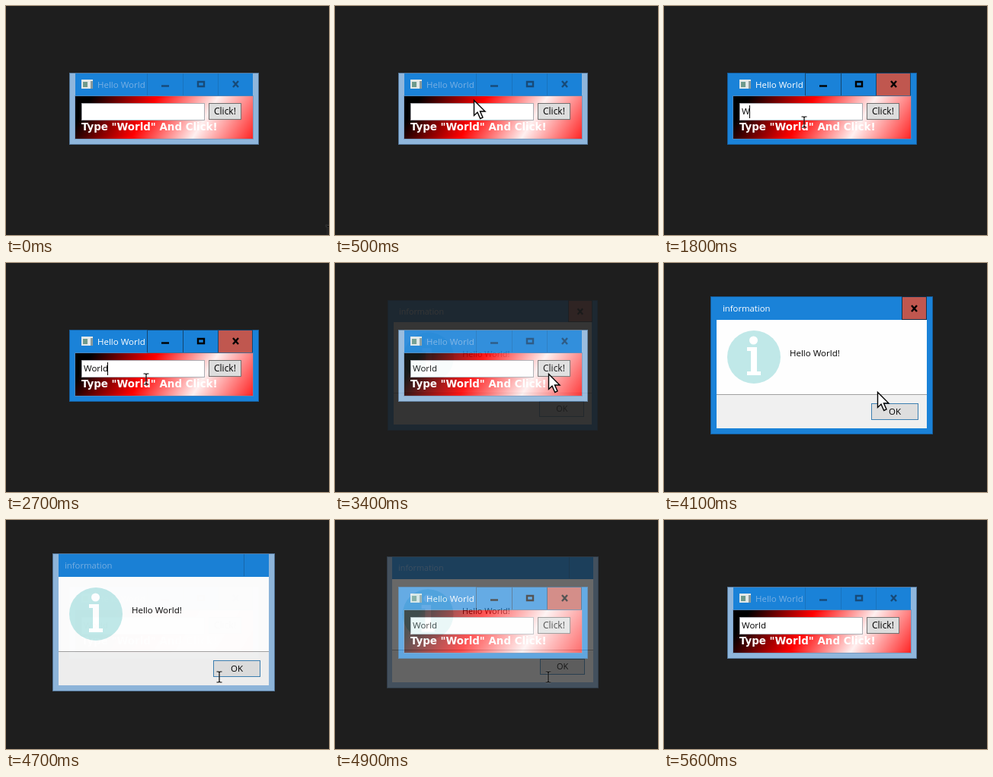
These frames come from a looping animation (424 by 302 pixels, 5.7 s). An HTML page:

```html
<!DOCTYPE html>
<html lang="en">
<head>
<meta charset="utf-8">
<title>Hello World</title>
<style>
html, body { margin: 0; width: 100%; height: 100%; overflow: hidden; background: #1e1e1e; }
svg { display: block; width: 424px; height: 302px; }
text { font: 11.5px "Open Sans", "Noto Sans", sans-serif; white-space: pre; }
.crisp { shape-rendering: crispEdges; }
.idle { fill: #8fb6dc; stroke: #55789b; }
.blue { fill: #1a82d8; }
.frame { stroke: #155f9f; }
.edge { fill: none; stroke: #15456f; }
.close { fill: #c0574f; }
.faded { fill: #78b0e4; }
.white { fill: #fff; }
.glyph { fill: none; stroke: #000; stroke-width: 2.4; }
.dim { stroke: #174a78; }
</style>
</head>
<body>
<svg viewBox="0 0 424 302">
  <defs>
    <linearGradient id="glow" gradientUnits="userSpaceOnUse" x1="95" y1="147" x2="283" y2="264">
      <stop offset="0" stop-color="#000"/>
      <stop offset=".33" stop-color="#f00"/>
      <stop offset=".64" stop-color="#fff0f0"/>
      <stop offset="1" stop-color="#f00"/>
    </linearGradient>
    <g id="buttons">
      <path d="M204 105.5h10"/>
      <path d="M252 100h8v6h-8z"/>
      <path d="M298 99l7 8m0-8l-7 8"/>
    </g>
  </defs>
  <rect width="424" height="302" fill="#1e1e1e"/>

  <g id="main">
    <g class="crisp">
      <rect class="idle" x="83.5" y="88.5" width="248" height="94"/>
      <rect class="blue" x="91" y="89" width="233" height="30"/>
    </g>
    <path class="edge crisp" opacity=".25" d="M185.5 89v29M232.5 89v29M278.5 89v29"/>
    <text class="faded" x="120" y="108">Hello World</text>
    <use href="#buttons" class="glyph dim"/>
    <g id="mainActive">
      <rect class="blue frame crisp" x="83.5" y="88.5" width="248" height="94"/>
      <rect class="close crisp" x="279" y="89" width="45" height="29"/>
      <path class="edge crisp" stroke="#0d2c47" d="M185.5 88.5h138v30h-138zM232.5 89v29M278.5 89v29"/>
      <text class="white" x="120" y="108">Hello World</text>
      <use href="#buttons" class="glyph"/>
    </g>
    <g class="crisp">
      <rect x="99" y="97" width="15" height="12" fill="#e4e8e8"/>
      <rect x="101" y="100" width="6" height="7" fill="#6f9a8c"/>
      <rect x="111" y="99" width="3" height="10" fill="#8a9a9c"/>
      <rect x="91" y="119" width="233" height="56" fill="url(#glow)"/>
      <rect x="90.5" y="118.5" width="234" height="57" fill="none" stroke="#6a86a8" opacity=".6"/>
      <rect x="99.5" y="128.5" width="161" height="22" fill="#fff" stroke="#abadb3"/>
      <rect id="click" x="266.5" y="128.5" width="42" height="21" fill="#ddd" stroke="#707070"/>
    </g>
    <text id="typed" x="102" y="143"></text>
    <rect id="caret" class="crisp" y="131" width="1" height="17"/>
    <text x="273" y="143" style="font-size:12px">Click!</text>
    <text class="white" x="99" y="164" style="font:bold 13.4px 'DejaVu Sans',sans-serif">Type "World" And Click!</text>
  </g>

  <g id="dialog">
    <g class="crisp">
      <rect class="idle" x="61.5" y="44.5" width="291" height="181"/>
      <rect class="blue" x="69" y="45" width="276" height="30"/>
    </g>
    <path class="edge crisp" opacity=".4" d="M312.5 45v29"/>
    <text class="faded" x="77" y="64" style="font-size:11.3px">information</text>
    <g id="dialogActive">
      <rect class="blue frame crisp" x="61.5" y="44.5" width="291" height="181"/>
      <rect class="close crisp" x="312.5" y="44.5" width="32" height="30" stroke="#15304a"/>
      <text class="white" x="77" y="64" style="font-size:11.3px">information</text>
      <path class="glyph" d="M325 56l7 8m0-8l-7 8"/>
    </g>
    <g class="crisp">
      <rect x="69" y="75" width="276" height="143" fill="#fefefe"/>
      <rect x="69" y="174" width="276" height="44" fill="#f0f0f0"/>
      <rect x="69" y="173" width="276" height="1" fill="#a0a0a0"/>
      <rect x="272.5" y="185.5" width="61" height="21" fill="#dedede" stroke="#3c7fb1"/>
    </g>
    <circle cx="118" cy="124" r="35" fill="#c0e8e8"/>
    <circle class="white" cx="117.5" cy="102" r="5.5"/>
    <path class="white" d="M109 111h13v32h5v5h-18v-5h5v-27h-5z"/>
    <text x="165" y="123">Hello World!</text>
    <text x="295" y="200">OK</text>
  </g>

  <path id="arrow" d="M.5.5V20.500L5 16.300L8.700 24.500L12 23L8.500 15H15Z" fill="#fff" stroke="#000" stroke-width="1.400"/>
  <g id="beam" fill="none">
    <path d="M-3.500-7H-1L0-6L1-7H3.500M0-6V6M-3.500 7H-1L0 6L1 7H3.500" stroke="#fff" stroke-width="2.400" opacity=".25"/>
    <path d="M-3.500-7H-1L0-6L1-7H3.500M0-6V6M-3.500 7H-1L0 6L1 7H3.500" stroke="#000" stroke-width="1.200"/>
  </g>
</svg>
<script>
const LOOP = 5700, STEP = 100;
const $ = id => document.getElementById(id);

// Linear track of [time, value] keys, held at both ends
function track(keys, t) {
  let [t0, v0] = keys[0];
  if (t <= t0) return v0;
  for (const [t1, v1] of keys.slice(1)) {
    if (t < t1) return v0 + (v1 - v0) * (t - t0) / (t1 - t0);
    [t0, v0] = [t1, v1];
  }
  return v0;
}

const cursorX = [[0, 423], [100, 400], [400, 200], [500, 182], [700, 184], [2700, 184],
  [3100, 280], [5000, 280], [5300, 288]];
const cursorY = [[0, 297], [100, 280], [400, 145], [500, 124], [700, 153], [2700, 153],
  [3100, 146], [3900, 146], [4300, 194], [4500, 195], [4700, 207], [5000, 207], [5300, 312]];
const mainFocus = [[600, 0], [900, 1], [3200, 1], [3400, 0], [4600, 0], [4800, 1], [5400, 1], [5600, 0]];
const dialogFocus = [[4400, 1], [4600, 0]];
const dialogAlpha = [[3300, 0], [3400, .1], [3700, .8], [3900, 1], [4600, 1], [4700, .99], [5000, 0]];
const dialogScale = [[3300, .93], [3700, .992], [3900, 1], [4700, 1], [5000, .93]];
const typing = [1700, 1900, 2100, 2300, 2500];
const caretOn = [[900, 1300], [1600, 3200], [5000, 5500]];

const within = (t, spans) => spans.some(([a, b]) => t >= a && t < b);
const show = (el, on) => el.setAttribute("visibility", on ? "visible" : "hidden");
const fade = (el, alpha) => el.setAttribute("opacity", alpha);

function draw(t) {
  const x = track(cursorX, t), y = track(cursorY, t);
  const beam = within(t, [[0, 300], [600, 2900], [4600, 5300]]);
  const arrow = !beam && t < 5300;
  for (const id of ["beam", "arrow"]) $(id).setAttribute("transform", `translate(${Math.round(x)} ${Math.round(y)})`);
  show($("beam"), beam);
  show($("arrow"), arrow);

  fade($("mainActive"), track(mainFocus, t));
  $("click").setAttribute("fill", within(t, [[3000, 3400]]) ? "#bee6fd" : "#ddd");

  $("typed").textContent = "World".slice(0, typing.filter(at => t >= at).length);
  $("caret").setAttribute("x", Math.floor(101.5 + $("typed").getComputedTextLength()));
  show($("caret"), within(t, caretOn));

  const alpha = track(dialogAlpha, t), scale = track(dialogScale, t);
  show($("dialog"), alpha > 0);
  fade($("dialog"), alpha);
  fade($("dialogActive"), track(dialogFocus, t));
  $("dialog").setAttribute("transform", `translate(207 135) scale(${scale}) translate(-207 -135)`);
}

const start = performance.now();
function tick() {
  const t = (performance.now() - start) % LOOP;
  draw(Math.floor(t / STEP) * STEP);
  requestAnimationFrame(tick);
}
tick();
</script>
</body>
</html>
```
